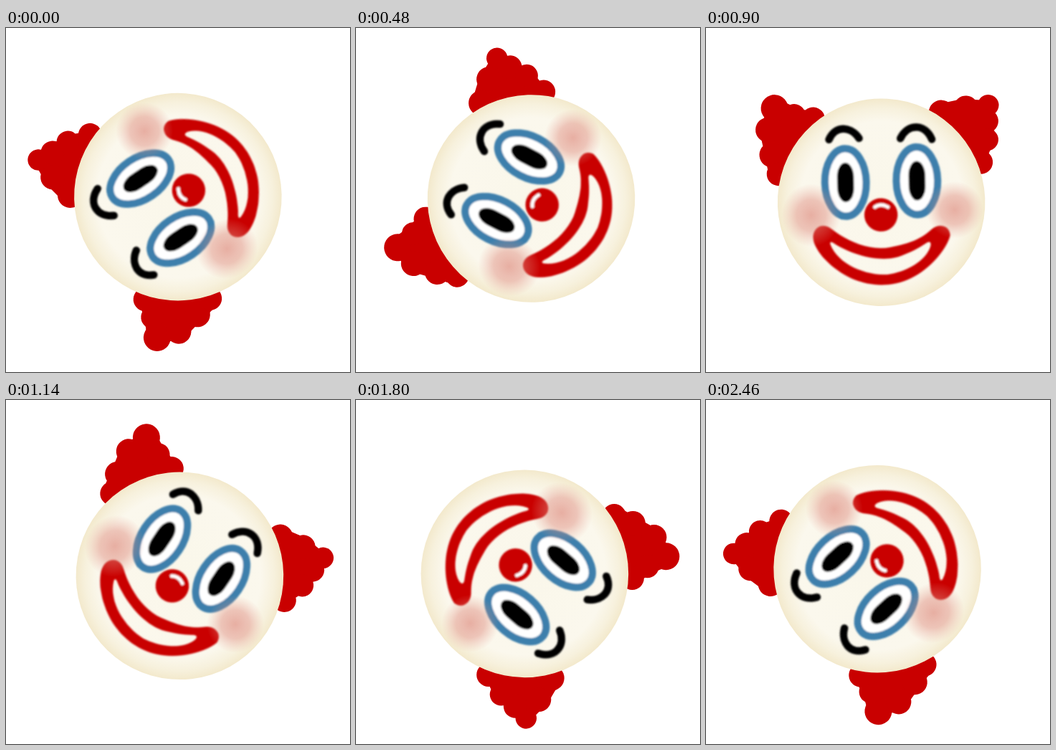
An HTML page that plays this animation: 480 by 480 pixels, repeating every 2520 ms.

```html
<!DOCTYPE html>
<html lang="en">
<head>
<meta charset="utf-8">
<title>Rolling clown</title>
<style>
html, body { margin: 0; width: 100%; height: 100%; overflow: hidden; background: #fff; }
svg { display: block; width: 100%; height: 100%; }
</style>
</head>
<body>
<svg viewBox="0 0 480 480">
  <defs>
    <radialGradient id="skin">
      <stop offset="0" stop-color="#faf7ea"/>
      <stop offset=".78" stop-color="#fbf8ed"/>
      <stop offset=".91" stop-color="#f7f1dd"/>
      <stop offset="1" stop-color="#f3e9cc"/>
    </radialGradient>
    <radialGradient id="blush">
      <stop offset="0" stop-color="#d9796c" stop-opacity=".58"/>
      <stop offset=".5" stop-color="#dc8376" stop-opacity=".44"/>
      <stop offset="1" stop-color="#e49a8c" stop-opacity="0"/>
    </radialGradient>
    <filter id="soft" x="-10%" y="-10%" width="120%" height="120%">
      <feGaussianBlur stdDeviation=".9"/>
    </filter>
    <g id="eye">
      <ellipse rx="28.8" ry="47.2" fill="#fff" stroke="#3e7fac" stroke-width="10.2"/>
      <rect x="-11.7" y="-27.5" width="23.4" height="55" rx="11.7" ry="20"/>
    </g>
  </defs>
  <g id="head">
    <g fill="#c90000">
      <path d="M47 200L56 174L83 174L112 167L160 200L110 280L88 276L66 247L46 222Z"/>
      <circle cx="54" cy="188" r="19"/>
      <circle cx="83" cy="185" r="16"/>
      <circle cx="109" cy="178" r="16.5"/>
      <circle cx="59" cy="219" r="17.5"/>
      <circle cx="79" cy="248" r="17.5"/>
      <circle cx="99" cy="268" r="16.5"/>
      <path d="M258 82L284 62L308 52L328 60L342 80L350 104L352 140L300 190Z"/>
      <circle cx="320.5" cy="54" r="14.7"/>
      <circle cx="294" cy="71" r="17"/>
      <circle cx="266" cy="92" r="17.5"/>
      <circle cx="328" cy="75" r="16.5"/>
      <circle cx="340" cy="98" r="15.7"/>
      <circle cx="346" cy="130" r="16.5"/>
    </g>
    <circle cx="245.3" cy="241" r="144.8" fill="url(#skin)"/>
    <g filter="url(#soft)">
      <path fill="#c90000" fill-rule="evenodd" d="M179 319C179 307 189 302 200 305C226 311 262 309 284 292C307 275 318 262 325 244C331 231 346 229 352 241C356 262 346 302 322 326C296 352 262 357 238 354C206 350 179 335 179 319Z
        M207 325C203 320 209 321 216 322C246 324 283 317 303 296C317 281 323 271 327 264C331 258 335 263 334 274C333 292 318 314 297 328C270 343 228 345 207 325Z"/>
      <use href="#eye" transform="translate(188.3 237.8) rotate(-27)"/>
      <use href="#eye" transform="translate(277 192.3) rotate(-27)"/>
      <g fill="none" stroke="#000" stroke-width="10.5" stroke-linecap="round" transform="translate(.4 1.2)">
        <path d="M141 193C140 170 161 163 178 173"/>
        <path d="M230 148C230 124 252 114 270 130"/>
      </g>
      <circle cx="252.5" cy="257" r="23.2" fill="#c90000"/>
      <path d="M240 251Q245 242 256.5 243" fill="none" stroke="#fff" stroke-width="4.8" stroke-linecap="round"/>
    </g>
    <ellipse rx="41" ry="44" fill="url(#blush)" transform="translate(165 300) rotate(-27)"/>
    <circle cx="342" cy="206" r="40" fill="url(#blush)"/>
  </g>
</svg>
<script>
const head = document.getElementById("head");
const STEP = 60, COUNT = 42, TILT = -0.5;
const TURN = 360 / (COUNT - 1);

// The first pose is held for two steps, then the head turns evenly.
function draw(ms) {
  const step = Math.floor(ms / STEP) % COUNT;
  const angle = (Math.max(step, 1) - 12) * TURN + TILT;
  head.setAttribute("transform", `rotate(${angle.toFixed(3)} 240.2 240.7)`);
}

const start = performance.now();
function tick() {
  draw(Math.max(0, performance.now() - start));
  requestAnimationFrame(tick);
}
draw(0);
requestAnimationFrame(tick);
</script>
</body>
</html>
```
